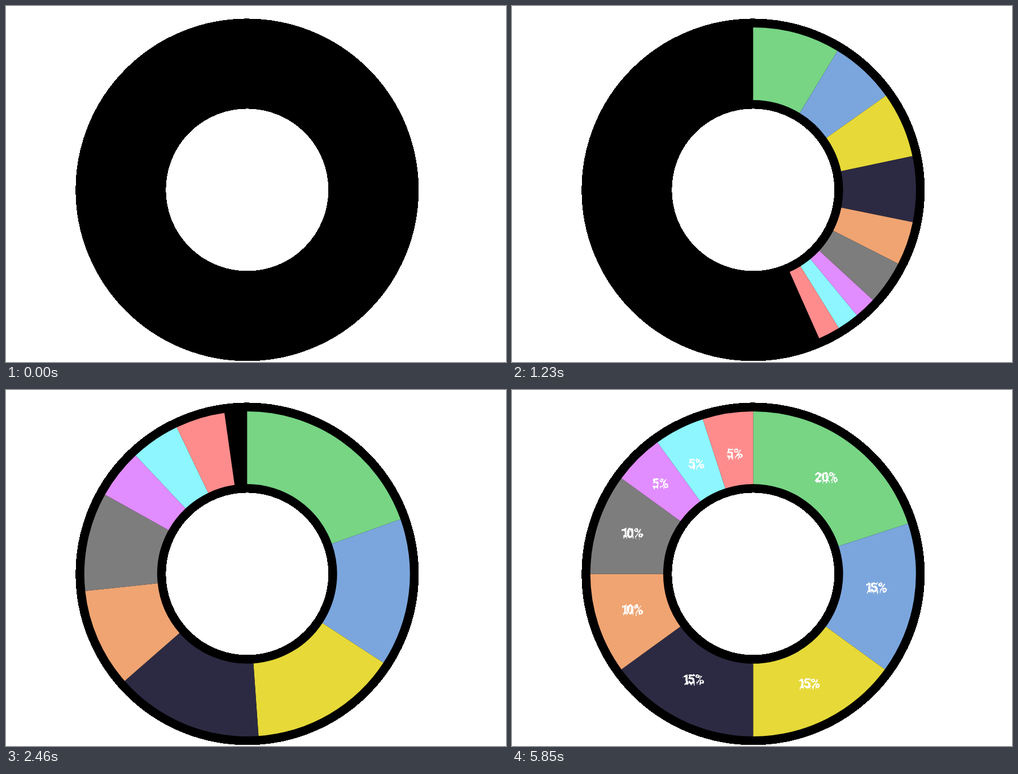
Animation, 886 px wide and 632 px high, one loop 6.33 s. Source, as an HTML page:

```html
<!DOCTYPE html>
<html lang="en">
<head>
<meta charset="utf-8">
<title>Donut chart</title>
<style>
  html, body { margin: 0; width: 100%; height: 100%; overflow: hidden; background: #fff; }
  svg { display: block; }
  text { font: 900 23px Roboto, "Open Sans", sans-serif; letter-spacing: -.8px; fill: #fff; text-anchor: middle; }
</style>
</head>
<body>
<svg id="stage" width="886" height="632" viewBox="0 0 886 632">
  <defs>
    <filter id="rough" x="-10%" y="-20%" width="120%" height="150%" color-interpolation-filters="sRGB">
      <feTurbulence type="fractalNoise" baseFrequency=".32 .12" numOctaves="2" seed="4"/>
      <feDisplacementMap in="SourceGraphic" scale="4" xChannelSelector="R" yChannelSelector="G"/>
    </filter>
  </defs>
  <circle cx="427.3" cy="326.4" r="224" fill="none" stroke="#000" stroke-width="160" shape-rendering="crispEdges"/>
  <g id="slices"></g>
  <g id="labels"></g>
</svg>
<script>
const LOOP = 6330, STEP = 30, SWEEP = 2700, FADE = 1800, STAGGER = 180;
const CX = 427.3, CY = 326.4, OUTER = 288.5, INNER = 159.4;

// percent, colour, label centre
const data = [
  [20, '#77d584', 556.5, 155], [15, '#7ba6dd', 645, 351], [15, '#e6d938', 526, 521],
  [15, '#2c2a42', 321, 514], [10, '#efa472', 212.5, 389.5], [10, '#7d7d7d', 212.5, 254],
  [5, '#e18cff', 262.5, 165.5], [5, '#8df6ff', 326.5, 131], [5, '#ff8c8c', 394.5, 113]
];

const add = (parent, tag, attrs) => {
  const node = document.createElementNS('http://www.w3.org/2000/svg', tag);
  for (const key in attrs) node.setAttribute(key, attrs[key]);
  return parent.appendChild(node);
};

const smooth = u => {
  u = Math.min(1, Math.max(0, u));
  return u * u * (3 - 2 * u);
};

const point = (turn, r) => {
  const a = turn * 2 * Math.PI;
  return `${(CX + r * Math.sin(a)).toFixed(2)} ${(CY - r * Math.cos(a)).toFixed(2)}`;
};

const wedge = (from, to) => {
  const large = to - from > .5 ? 1 : 0;
  return `M${point(from, OUTER)}A${OUTER} ${OUTER} 0 ${large} 1 ${point(to, OUTER)}` +
    `L${point(to, INNER)}A${INNER} ${INNER} 0 ${large} 0 ${point(from, INNER)}Z`;
};

// short runs of paint below the digits
const drips = (x, y, width) => {
  let d = '';
  for (let i = 0, dx = 4; dx < width - 3; i++, dx += 5.5)
    d += `M${x - width / 2 + dx} ${y + 5}v${3.5 + 2.5 * Math.abs(Math.sin(i * 2.3 + x))}`;
  return d;
};

const slices = document.getElementById('slices');
const labels = document.getElementById('labels');
let sum = 0;
const parts = data.map(([percent, fill, x, y]) => {
  const start = sum / 100;
  sum += percent;
  const path = add(slices, 'path', { fill });
  const label = add(labels, 'g', { opacity: 0 });
  const ink = add(label, 'g', { filter: 'url(#rough)' });
  const narrow = percent === 10 || percent === 15;
  add(ink, 'text', { x, y: y + 8, dx: narrow ? '0 -3' : '0' }).textContent = percent + '%';
  const width = percent === 5 ? 28 : narrow ? 37 : 41;
  add(ink, 'path', { d: drips(x, y, width), stroke: '#fff', 'stroke-width': 1.5 });
  return { path, label, start, end: sum / 100 };
});

function draw(t) {
  const sweep = smooth(t / SWEEP);
  parts.forEach(({ path, label, start, end }, i) => {
    path.setAttribute('d', sweep ? wedge(start * sweep, end * sweep) : '');
    const alpha = smooth((t - SWEEP - i * STAGGER) / FADE);
    label.setAttribute('opacity', alpha < .04 ? 0 : alpha);
  });
}

const begin = performance.now();
function tick() {
  const t = (performance.now() - begin) % LOOP;
  draw(Math.floor(t / STEP) * STEP);
  requestAnimationFrame(tick);
}
draw(0);
requestAnimationFrame(tick);
</script>
</body>
</html>
```
